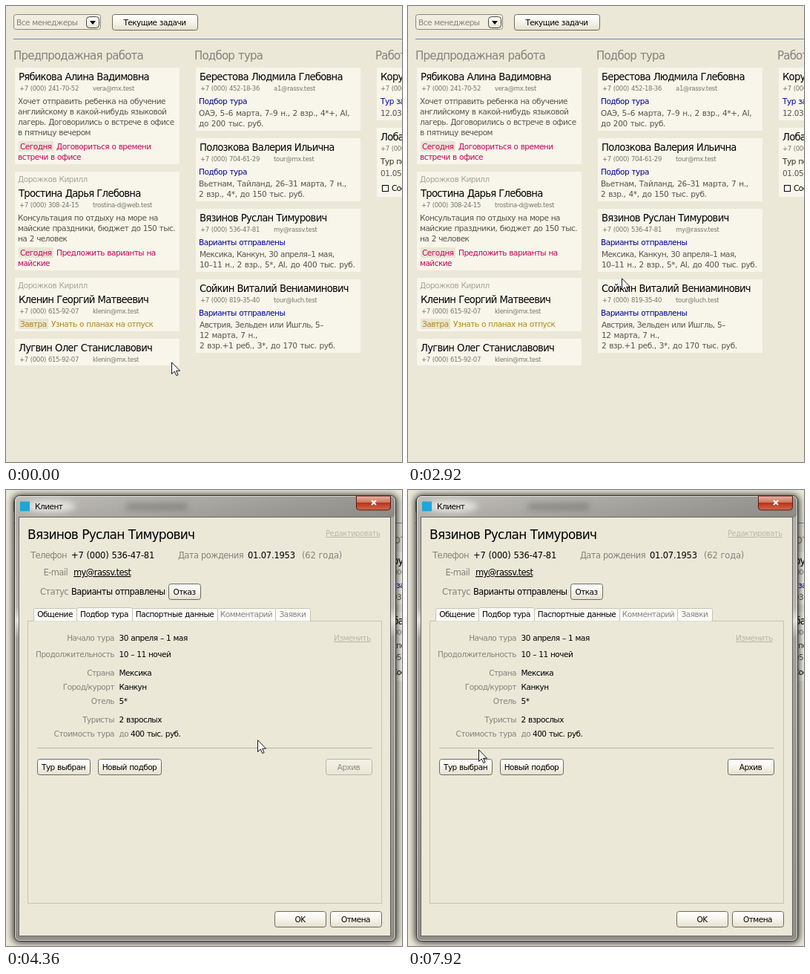
Recreate the animation shown at these times as an HTML page. Size 534x614 px, loop 8 s.

```html
<!DOCTYPE html>
<html lang="ru">
<head>
<meta charset="utf-8">
<title>Клиенты</title>
<style>
html, body { margin: 0; width: 100%; height: 100%; overflow: hidden; background: #ebe8d8; }
svg { display: block; width: 534px; height: 614px; }
text {
  font: 10.5px "DejaVu Sans", sans-serif;
  letter-spacing: -.5px; word-spacing: .5px; fill: #000;
}
.head { font-size: 15px; letter-spacing: -.8px; word-spacing: 1px; fill: #858378; }
.name { font-size: 13.2px; letter-spacing: -.75px; }
.small { font-size: 8.5px; letter-spacing: -.32px; fill: #77756c; }
.body { fill: #55534c; }
.num { fill: #55534c; letter-spacing: -.33px; word-spacing: .8px; }
.blue { fill: #00009a; }
.olive { fill: #33331a; }
.owner { fill: #a5a397; }
.today { fill: #c8005c; }
.later { fill: #b5860f; }
.grey { fill: #85837a; }
.pale { fill: #b9b7a8; text-decoration: underline; }
.edit { font-size: 9.8px; letter-spacing: -.35px; }
.title { font-size: 17px; letter-spacing: -.78px; }
.mid { font-size: 11.5px; letter-spacing: -.58px; }
.wide { letter-spacing: -.2px; }
.link { text-decoration: underline; }
.end { text-anchor: end; }
.center { text-anchor: middle; }

#cursor, #arrow, #hand, #ring, #dialog, #archive { animation: 8s step-end infinite; }
#cursor { animation-name: move; }
#arrow { animation-name: arrow; }
#hand { animation-name: hand; }
#ring { animation-name: ring; }
#dialog { animation-name: open; }
#archive { animation-name: enable; }

@keyframes move {
  0% { transform: translate(223px, 479px); }
  10.375% { transform: translate(223px, 478px); }
  11.875% { transform: translate(223px, 477px); }
  18.875% { transform: translate(223px, 476px); }
  29.375% { transform: translate(225px, 469px); }
  30.875% { transform: translate(230px, 455px); }
  32.75% { transform: translate(241px, 426px); }
  34.625% { transform: translate(262px, 392px); }
  36.5% { transform: translate(288px, 366px); }
  38.375% { transform: translate(302px, 355px); }
  39.875% { transform: translate(315px, 349px); }
  41.625% { transform: translate(324px, 347px); }
  43.125% { transform: translate(331px, 346px); }
  46.5% { transform: translate(333px, 340px); }
  48% { transform: translate(334px, 336px); }
  54.5% { transform: translate(339px, 336px); }
  92.25% { transform: translate(334px, 336px); }
  93.75% { transform: translate(302px, 337px); }
  95.625% { transform: translate(232px, 336px); }
  97.125% { transform: translate(157px, 334px); }
  99%, 100% { transform: translate(95px, 349px); }
}
@keyframes arrow { 0%, 54.5%, 100% { opacity: 1; } 38.375% { opacity: 0; } }
@keyframes hand { 0%, 54.5%, 100% { opacity: 0; } 38.375% { opacity: 1; } }
@keyframes ring { 0%, 54.5%, 100% { opacity: 0; } 52.75% { opacity: 1; } }
@keyframes open { 0% { visibility: hidden; } 54.5%, 100% { visibility: visible; } }
@keyframes enable { 0% { opacity: .4; } 56.5%, 100% { opacity: 1; } }
</style>
</head>
<body>
<svg viewBox="0 0 534 614">
  <defs>
    <linearGradient id="face" x2="0" y2="1">
      <stop stop-color="#fff"/><stop offset=".5" stop-color="#f6f4ea"/><stop offset="1" stop-color="#e4e0ce"/>
    </linearGradient>
    <linearGradient id="glass" x2="0" y2="1">
      <stop stop-color="#c2c0b9"/><stop offset=".05" stop-color="#b2b0a9"/>
      <stop offset=".25" stop-color="#b9b7b0"/><stop offset=".28" stop-color="#e2e1dc"/>
      <stop offset=".32" stop-color="#a3a29c"/><stop offset="1" stop-color="#908f8a"/>
    </linearGradient>
    <linearGradient id="shade">
      <stop stop-color="#444" stop-opacity="0"/><stop offset="1" stop-color="#444" stop-opacity=".35"/>
    </linearGradient>
    <linearGradient id="red" x2="0" y2="1">
      <stop stop-color="#e6b3a4"/><stop offset=".45" stop-color="#d07660"/>
      <stop offset=".5" stop-color="#b8331c"/><stop offset="1" stop-color="#d2694c"/>
    </linearGradient>
    <filter id="shadow" x="-10%" y="-10%" width="120%" height="120%"><feGaussianBlur stdDeviation="5"/></filter>
    <filter id="blur" x="-30%" y="-100%" width="160%" height="300%"><feGaussianBlur stdDeviation="4"/></filter>
  </defs>

  <rect width="534" height="614" fill="#ebe8d8"/>
  <g id="page"></g>

  <g id="dialog">
    <rect x="9" y="6" width="519" height="604" rx="9" opacity=".75" filter="url(#shadow)"/>
    <rect x="11.5" y="7.5" width="514" height="600" rx="7" fill="url(#glass)" stroke="#33322f"/>
    <rect x="12" y="8" width="513" height="29" rx="6" fill="url(#shade)"/>
    <rect x="12.5" y="8.5" width="512" height="598" rx="6" fill="none" stroke="#fff" stroke-opacity=".6"/>
    <g filter="url(#blur)">
      <ellipse cx="60" cy="22" rx="34" ry="8" fill="#fff" opacity=".65"/>
      <rect x="162" y="18" width="82" height="9" fill="#555" opacity=".4"/>
    </g>
    <rect x="17.5" y="36.5" width="501" height="564" fill="#ebe8d8" stroke="#66645c"/>
    <rect x="19" y="15.5" width="13" height="13" fill="#1ea5dc"/>
    <path d="M472.5 8V23q0 4 4 4h38q4 0 4-4V8z" fill="url(#red)" stroke="#5a1c12"/>
    <path d="M493 14l6 6m0-6l-6 6" stroke="#fff" stroke-width="2"/>
    <g id="form"></g>
  </g>

  <g id="cursor">
    <path id="arrow" d="M.5.8V16.5L4.2 13l2.6 5.6 2.3-1L6.6 12.2h4.9z" fill="#fff" stroke="#111"/>
    <g id="hand" stroke="#000" fill="none">
      <circle id="ring" cx="6.5" cy="1" r="9.8"/>
      <path fill="#fff" d="M5 13.5V2a1.6 1.6 0 0 1 3.2 0v6q0-1 1.4-1t1.6 1.5q.3-1 1.5-.8t1.4 1.5q.3-.8 1.3-.6t1.1 1.6v4.5l-2 4v2.8H6.5V19L1 12.5q-.7-1.6.6-2.2t2 .6z"/>
      <path d="M8.2 8v4m3-3.5V12m2.9-3v3"/>
    </g>
  </g>
</svg>
<script>
const text = (x, y, cls, s) => `<text x="${x}" y="${y}" class="${cls}">${s}</text>`;
const box = (x, y, w, h, fill, stroke = 'none', r = 0) =>
  `<rect x="${x}" y="${y}" width="${w}" height="${h}" rx="${r}" fill="${fill}" stroke="${stroke}"/>`;
const button = (x, y, w, label) =>
  box(x + .5, y + .5, w - 1, 21, 'url(#face)', '#6b695f', 3) + text(x + w / 2 - .5, y + 15, 'center', label);

// Each line of a card: [baseline offset, class, text, optional x offset]
const card = (x, y, h, ...lines) => box(x, y, 222, h, '#f8f6ea') +
  lines.map(([dy, cls, s, dx = 5]) => text(x + dx, y + dy, cls, s)).join('');
const person = (dy, name, phone, mail) =>
  [[dy, 'name', name], [dy + 14, 'small', phone, 6], [dy + 14, 'small', mail, 105]];
const tag = (x, y, w, cls, word, first, rest = '') =>
  box(x, y - 11, w, 14, '#e9e5d4') + text(x + 2, y, cls, word) +
  text(x + w + 4, y, cls, first) + text(x - 1, y + 14, cls, rest);

document.getElementById('page').innerHTML = [
  box(10.5, 11.5, 117, 20, '#f1eee1', '#8b897b', 3),
  text(14, 26, 'grey', 'Все менеджеры'),
  box(108.5, 14.5, 17, 15, 'url(#face)', '#45443d', 4),
  '<path d="M113 20h8l-4 5z"/>',
  button(143, 11, 116, 'Текущие задачи'),
  box(10, 44, 524, 1, '#6a89bd'),
  text(10, 72, 'head', 'Предпродажная работа'),
  text(254, 72, 'head', 'Подбор тура'),
  text(498, 72, 'head', 'Работа'),

  card(12, 83, 130, ...person(17, 'Рябикова Алина Вадимовна', '+7 (000) 241-70-52', 'vera@mx.test'),
    [49, 'body', 'Хочет отправить ребенка на обучение', 4],
    [63, 'body', 'английскому в какой-нибудь языковой', 4],
    [77, 'body', 'лагерь. Договорились о встрече в офисе', 4],
    [91, 'body', 'в пятницу вечером', 4]),
  tag(17, 193, 47, 'today', 'Сегодня', 'Договориться о времени', 'встречи в офисе'),
  card(12, 223, 133, [14, 'owner', 'Дорожков Кирилл', 4],
    ...person(34, 'Тростина Дарья Глебовна', '+7 (000) 308-24-15', 'trostina-d@web.test'),
    [66, 'body', 'Консультация по отдыху на море на', 4],
    [80, 'body', 'майские праздники, бюджет до 150 тыс.', 4],
    [94, 'body', 'на 2 человек', 4]),
  tag(17, 336, 47, 'today', 'Сегодня', 'Предложить варианты на', 'майские'),
  card(12, 366, 72, [14, 'owner', 'Дорожков Кирилл', 4],
    ...person(34, 'Кленин Георгий Матвеевич', '+7 (000) 615-92-07', 'klenin@mx.test')),
  tag(17, 432, 40, 'later', 'Завтра', 'Узнать о планах на отпуск'),
  card(12, 448, 36, ...person(17, 'Лугвин Олег Станиславович', '+7 (000) 615-92-07', 'klenin@mx.test')),

  card(256, 83, 85, ...person(17, 'Берестова Людмила Глебовна', '+7 (000) 452-18-36', 'a1@rassv.test'),
    [49, 'blue', 'Подбор тура', 4],
    [65, 'num', 'ОАЭ, 5–6 марта, 7–9 н., 2 взр., 4*+, AI,', 4],
    [79, 'num', 'до 200 тыс. руб.', 4]),
  card(256, 178, 85, ...person(17, 'Полозкова Валерия Ильична', '+7 (000) 704-61-29', 'tour@mx.test'),
    [49, 'blue', 'Подбор тура', 4],
    [65, 'num', 'Вьетнам, Тайланд, 26–31 марта, 7 н.,', 4],
    [79, 'num', '2 взр., 4*, до 150 тыс. руб.', 4]),
  card(256, 273, 85, ...person(17, 'Вязинов Руслан Тимурович', '+7 (000) 536-47-81', 'my@rassv.test'),
    [49, 'blue', 'Варианты отправлены', 4],
    [65, 'body', 'Мексика, Канкун, 30 апреля–1 мая,'],
    [79, 'num', '10–11 н., 2 взр., 5*, AI, до 400 тыс. руб.']),
  card(256, 368, 99, ...person(17, 'Сойкин Виталий Вениаминович', '+7 (000) 819-35-40', 'tour@luch.test'),
    [49, 'blue', 'Варианты отправлены', 4],
    [65, 'body', 'Австрия, Зельден или Ишгль, 5–'],
    [79, 'num', '12 марта, 7 н.,'],
    [93, 'num', '2 взр.+1 реб., 3*, до 170 тыс. руб.']),

  card(500, 83, 71, [17, 'name', 'Корунов'], [31, 'small', '+7 (000) 267'],
    [49, 'blue', 'Тур заказан'], [65, 'num', '12.03, 7 н.']),
  card(500, 164, 93, [17, 'name', 'Лобазин'], [31, 'small', '+7 (000) 390'],
    [49, 'olive', 'Тур подобран'], [65, 'num', '01.05, 9 н.'], [85, '', 'Состав', 20]),
  box(507.5, 241.5, 8, 8, '#fff', '#000')
].join('');

const tab = (x, w, label, cls = '', lift = 0) =>
  `<path d="M${x + .5} 176.5V${161.5 - lift}q0-2 2-2h${w - 4}q2 0 2 2V176.5" fill="#fdfcf8" stroke="#c6c3b2"/>` +
  text(x + w / 2, 171, 'center ' + cls, label);
const field = (y, label, value, x = 152.5) => text(146, y, 'end grey', label) + text(x, y, '', value);

document.getElementById('form').innerHTML = [
  text(39, 26, '', 'Клиент'),
  text(29, 66, 'title', 'Вязинов Руслан Тимурович'),
  text(431, 62, 'pale edit', 'Редактировать'),
  text(82, 92, 'mid grey end', 'Телефон'),
  text(88, 92, 'mid wide', '+7 (000) 536-47-81'),
  text(320, 92, 'mid grey end', 'Дата рождения'),
  text(326, 92, 'mid wide', '01.07.1953'),
  text(399, 92, 'mid wide grey', '(62 года)'),
  text(83, 115, 'mid grey end', 'E-mail'),
  text(91, 115, 'mid link', 'my@rassv.test'),
  text(84, 141, 'mid grey end', 'Статус'),
  text(88, 141, 'mid', 'Варианты отправлены'),
  button(219, 126, 44, 'Отказ'),

  box(29.5, 176.5, 477, 380, 'none', '#c6c3b2'),
  tab(37, 58, 'Общение'),
  tab(170, 115, 'Паспортные данные'),
  tab(285, 78, 'Комментарий', 'grey'),
  tab(363, 47, 'Заявки', 'grey'),
  tab(95, 75, 'Подбор тура', '', 1),

  text(442, 203, 'pale', 'Изменить'),
  field(203, 'Начало тура', '30 апреля – 1 мая'),
  field(225, 'Продолжительность', '10 – 11 ночей'),
  field(250, 'Страна', 'Мексика'),
  field(269, 'Город/курорт', 'Канкун'),
  field(288, 'Отель', '5*'),
  field(313, 'Туристы', '2 взрослых'),
  field(332, 'Стоимость тура', '400 тыс. руб.', 168),
  text(152.5, 332, 'grey', 'до'),
  box(42, 347, 452, 1, '#b9b7a8'),
  button(42, 362, 72, 'Тур выбран'),
  button(124, 362, 86, 'Новый подбор'),
  `<g id="archive">${button(431, 362, 63, 'Архив')}</g>`,
  button(362, 567, 70, 'OK'),
  button(437, 567, 70, 'Отмена')
].join('');
</script>
</body>
</html>
```
